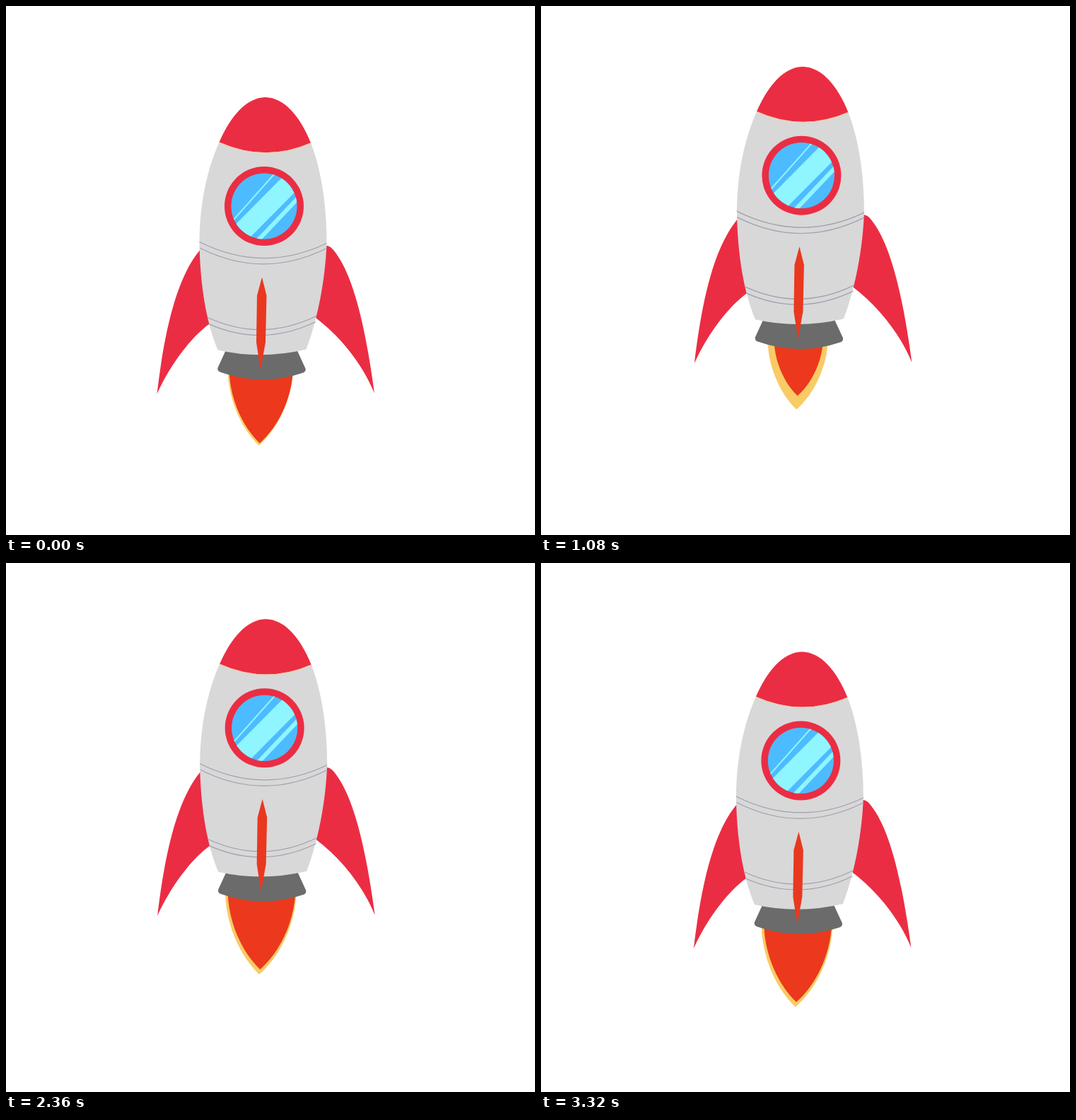
An HTML page that plays this animation: 748 px wide and 748 px high, repeating every 3360 ms.

```html
<!DOCTYPE html>
<html lang="en">
<head>
<meta charset="utf-8">
<title>Rocket</title>
<style>
  html, body { margin: 0; width: 100%; height: 100%; overflow: hidden; background: #fff; }
  svg { display: block; width: 100%; height: 100%; }
</style>
</head>
<body>
<svg viewBox="0 0 748 748">
  <defs>
    <clipPath id="pane"><circle cx="365.5" cy="282.5" r="46.6"/></clipPath>
    <path id="flame" d="M-.44 -.06 L-.4415 0 C-.43 .4 -.25 .78 -.02 1 C.23 .78 .42 .4 .4415 0 L.44 -.06Z"/>
  </defs>
  <g id="rocket">
    <use id="outer" href="#flame" fill="#f8cb66"/>
    <use id="inner" href="#flame" fill="#ec381c"/>
    <g fill="#eb2d43">
      <path d="M276 343 C240 385 224 465 214 548 C232 508 260 470 288 449Z"/>
      <path d="M450 338 Q458 337 464 345 C495 383 511 470 521.5 547 C505 507 475 468 438 440Z"/>
    </g>
    <path fill="#6b6b6b" d="M311 487 L300 511 Q299 515 303 517 Q362 538 421 518 Q425 516 424 512 L412 486Z"/>
    <path fill="#d8d8d8" d="M302 192 C283 235 274 285 274 335 C275 385 281 440 300 486 Q362 500 425 485 C442 440 452 385 454 335 C454 285 447 232 431.5 193Z"/>
    <path fill="#eb2d43" d="M302 192 C318 155 341 129 367 128.5 C394 129 416 155 431.5 193 Q367 221 302 192Z"/>
    <g fill="none" stroke="#a0a0b0" stroke-width="1.2">
      <path stroke="#f0cfa8" d="M302 192.5 Q367 221.5 431.5 193.5"/>
      <path d="M274 333 Q364 378 454 335"/>
      <path d="M274.5 341.5 Q364 387 454 342"/>
      <path d="M286 440 Q363 475.5 440 437.5"/>
      <path d="M287.5 449 Q363 482.5 438.5 446"/>
    </g>
    <circle cx="365.5" cy="282.5" r="56" fill="#eb2d43"/>
    <g clip-path="url(#pane)" stroke="#8ff5ff">
      <circle cx="365.5" cy="282.5" r="47" fill="#4dbbff" stroke="none"/>
      <path stroke-width="2" d="M387 229 L314 311"/>
      <path stroke-width="27.5" d="M421 231 L317 336"/>
      <path stroke-width="6" d="M425 259 L350 338"/>
    </g>
    <path fill="#e93820" d="M362.5 383 L369 409 L367.5 475 L360.5 514 L354.5 475 L355.5 409Z"/>
  </g>
</svg>
<script>
  const STEP = 40, STEPS = 84, BOB = 42, PULSE = 12;
  const wave = (n, period) => Math.cos(2 * Math.PI * n / period);

  function place(id, x, y, size) {
    document.getElementById(id).setAttribute("transform", `translate(${x} ${y}) scale(${size})`);
  }

  function draw(time) {
    const n = Math.floor(time / STEP) % STEPS;
    const bob = 27 * (wave(n, BOB) - 1);
    // Each shake is a slow drift plus a quick tremble
    const shakeX = 2.3 * wave(n - 26, 53) + 2 * wave(n - 25.7, 6.56);
    const shakeY = 0.8 * wave(n - 52, STEPS) + 2.1 * wave(n - 27, 6.7) - 0.9;
    place("rocket", shakeX, bob + shakeY, 1);
    place("outer", 360.2, 517, 114 + 20.3 * wave(n + 4, PULSE));
    place("inner", 361.3, 515.5, 93.5 + 17.2 * wave(n + 2, PULSE));
  }

  const start = performance.now();
  function tick() {
    draw(performance.now() - start);
    requestAnimationFrame(tick);
  }
  tick();
</script>
</body>
</html>
```
